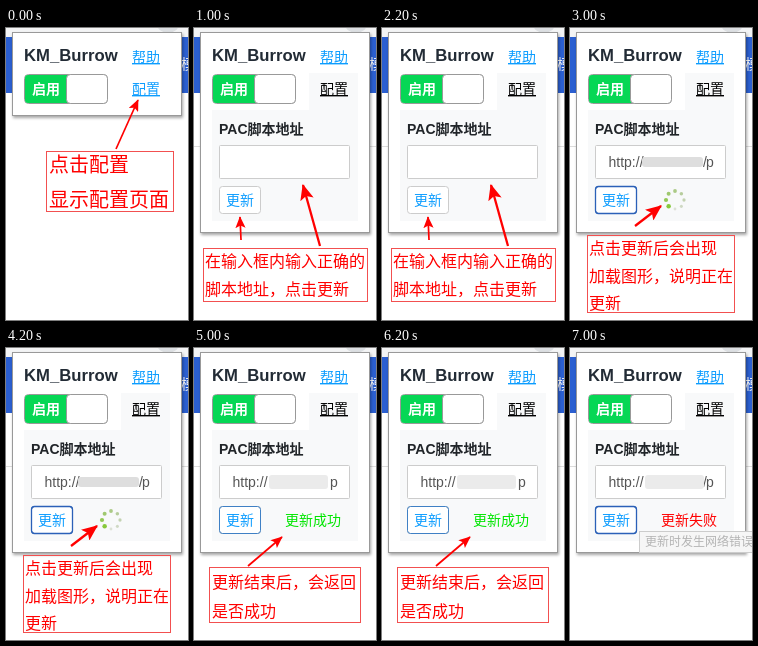
An HTML page that plays this animation: 182x292 px, repeating every 8 s.

```html
<!DOCTYPE html>
<html lang="zh-CN">
<head>
<meta charset="utf-8">
<title>配置说明</title>
<style>
  html, body { margin: 0; width: 100%; height: 100%; overflow: hidden; background: #fff; }
  svg { display: block; width: 182px; height: 292px; }
  text { font: 14px "Liberation Sans", "Noto Sans CJK SC", "Noto Sans CJK", sans-serif; }
  .bold { font-weight: 700; }
  .link { fill: #0d9dff; text-decoration: underline; }
  .note text { font-size: 16px; fill: #f00; }
  .note rect { fill: none; stroke: #f25050; }
  .note line { stroke: #f00; stroke-width: 1.7; marker-end: url(#head); }
  .note .thick { stroke-width: 2.3; }
  .note .large { font-size: 20px; }

  .start, .intro, .input, .loading, .success, .failure, .filled, .focus, .result {
    visibility: hidden;
    animation: 8s step-end infinite;
  }
  .start { animation-name: start; }
  .intro { animation-name: intro; }
  .input { animation-name: input; }
  .loading { animation-name: loading; }
  .success { animation-name: success; }
  .failure { animation-name: failure; }
  .filled { animation-name: filled; }
  .focus { animation-name: focus; }
  .result { animation-name: result; }
  @keyframes start { 0% { visibility: visible } 12.5%, 100% { visibility: hidden } }
  @keyframes intro { 0% { visibility: hidden } 12.5%, 100% { visibility: visible } }
  @keyframes input { 0%, 37.5%, 100% { visibility: hidden } 12.5% { visibility: visible } }
  @keyframes loading { 0%, 62.5%, 100% { visibility: hidden } 37.5% { visibility: visible } }
  @keyframes success { 0%, 87.5%, 100% { visibility: hidden } 62.5% { visibility: visible } }
  @keyframes failure { 0% { visibility: hidden } 87.5%, 100% { visibility: visible } }
  @keyframes filled { 0% { visibility: hidden } 37.5%, 100% { visibility: visible } }
  @keyframes focus { 0%, 62.5% { visibility: hidden } 37.5%, 87.5%, 100% { visibility: visible } }
  @keyframes result { 0% { visibility: hidden } 62.5%, 100% { visibility: visible } }
</style>
</head>
<body>
<svg viewBox="0 0 182 292">
  <defs>
    <marker id="head" markerWidth="7" markerHeight="6" refX="6.5" refY="3" orient="auto">
      <path d="M0 0L7 3L0 6L1.5 3Z" fill="#f00"/>
    </marker>
    <filter id="shadow" x="-10%" y="-10%" width="120%" height="120%">
      <feDropShadow dx="1" dy="2" stdDeviation="1.6" flood-color="#000" flood-opacity=".35"/>
    </filter>
  </defs>

  <!-- page behind the popup -->
  <rect width="182" height="9" fill="#f3f4f5"/>
  <ellipse cx="162" cy="-4" rx="11" ry="9" fill="#dcdfe2"/>
  <rect y="9" width="182" height="56" fill="#2b5fd0"/>
  <text x="175" y="41" fill="#fff">模</text>
  <path class="intro" d="M0 118.5H182" stroke="#ddd"/>

  <!-- popup -->
  <rect class="start" x="6.5" y="4.5" width="169" height="83" fill="#fff" stroke="#999" filter="url(#shadow)"/>
  <g class="intro">
    <rect x="6.5" y="4.5" width="169" height="200" fill="#fff" stroke="#999" filter="url(#shadow)"/>
    <path d="M115 45H164V193H18V82H115Z" fill="#f8f9fa"/>
  </g>
  <text class="bold" x="18" y="33" fill="#222b35" style="font-size:16.7px">KM_Burrow</text>
  <text class="link" x="126" y="34">帮助</text>
  <rect x="18.5" y="46.5" width="83" height="29" rx="4" fill="#fff" stroke="#999"/>
  <path d="M62 47H22Q19 47 19 50V72Q19 75 22 75H62Z" fill="#06d755"/>
  <rect x="60.5" y="46.5" width="41" height="29" rx="4" fill="#fff" stroke="#999"/>
  <text class="bold" x="26" y="66" fill="#fff">启用</text>
  <text class="link start" x="126" y="66">配置</text>

  <g class="intro">
    <text x="126" y="66" text-decoration="underline">配置</text>
    <text class="bold" x="25" y="105.5" fill="#212529">PAC脚本地址</text>
    <rect x="25.5" y="117.5" width="130" height="33" rx="1" fill="#fff" stroke="#ccc"/>
    <rect x="25.5" y="158.5" width="41" height="27" rx="3" fill="#fff" stroke="#ccc"/>
    <text x="32" y="177" fill="#0d9dff">更新</text>
  </g>

  <g class="filled">
    <text x="38.5" y="139" fill="#555">http://</text>
    <text x="136" y="139" fill="#555">p</text>
    <rect x="25.5" y="158.5" width="41" height="27" rx="3" fill="none" stroke="#3f80c5"/>
  </g>
  <g class="focus">
    <text x="133" y="139" fill="#555">/</text>
    <rect x="25.5" y="158.5" width="41" height="27" rx="3" fill="none" stroke="#2b60b8" stroke-width="1.3"/>
  </g>
  <rect class="loading" x="72" y="129" width="61" height="10" rx="3" fill="#dedede"/>
  <rect class="result" x="75" y="127" width="59" height="14" rx="3" fill="#ebebeb"/>

  <!-- notes -->
  <g class="note start">
    <rect x="40.5" y="123.5" width="127" height="60"/>
    <text class="large" x="43" y="144">点击配置</text>
    <text class="large" x="43" y="179">显示配置页面</text>
    <line x1="110" y1="121" x2="132" y2="72"/>
  </g>
  <g class="note input">
    <rect x="9.5" y="220.5" width="164" height="53"/>
    <text x="11" y="239">在输入框内输入正确的</text>
    <text x="11" y="267">脚本地址，点击更新</text>
    <line x1="47" y1="212" x2="46" y2="189"/>
    <line class="thick" x1="126" y1="218" x2="109" y2="157"/>
  </g>
  <g class="note loading">
    <rect x="17.5" y="207.5" width="147" height="77"/>
    <text x="19" y="226">点击更新后会出现</text>
    <text x="19" y="254">加载图形，说明正在</text>
    <text x="19" y="281">更新</text>
    <line class="thick" x1="65" y1="198" x2="91" y2="178"/>
  </g>
  <g id="spinner" class="loading"></g>
  <g class="note success">
    <rect x="15.5" y="219.5" width="151" height="55"/>
    <text x="18" y="240">更新结束后，会返回</text>
    <text x="18" y="269">是否成功</text>
    <line x1="54" y1="218" x2="88" y2="189"/>
  </g>
  <text class="success" x="91" y="177" fill="#00e600">更新成功</text>

  <g class="failure">
    <text x="91" y="177" fill="#f00">更新失败</text>
    <rect x="69.5" y="183.5" width="116" height="21" fill="#f6f6f6" stroke="#ccc"/>
    <text x="75" y="198" fill="#b4b4b4" style="font-size:12px">更新时发生网络错误</text>
  </g>
</svg>
<script>
  // dots grow and darken towards the lower left
  const spinner = document.getElementById('spinner');
  for (let i = 0; i < 8; i++) {
    const angle = (10 - i) * Math.PI / 4;
    const dot = document.createElementNS('http://www.w3.org/2000/svg', 'circle');
    dot.setAttribute('cx', 105 + 9 * Math.cos(angle));
    dot.setAttribute('cy', 172 + 9 * Math.sin(angle));
    dot.setAttribute('r', 1.4 + i * .12);
    dot.setAttribute('fill', `hsl(88 ${15 + i * 6}% ${86 - i * 5}%)`);
    spinner.append(dot);
  }
</script>
</body>
</html>
```
